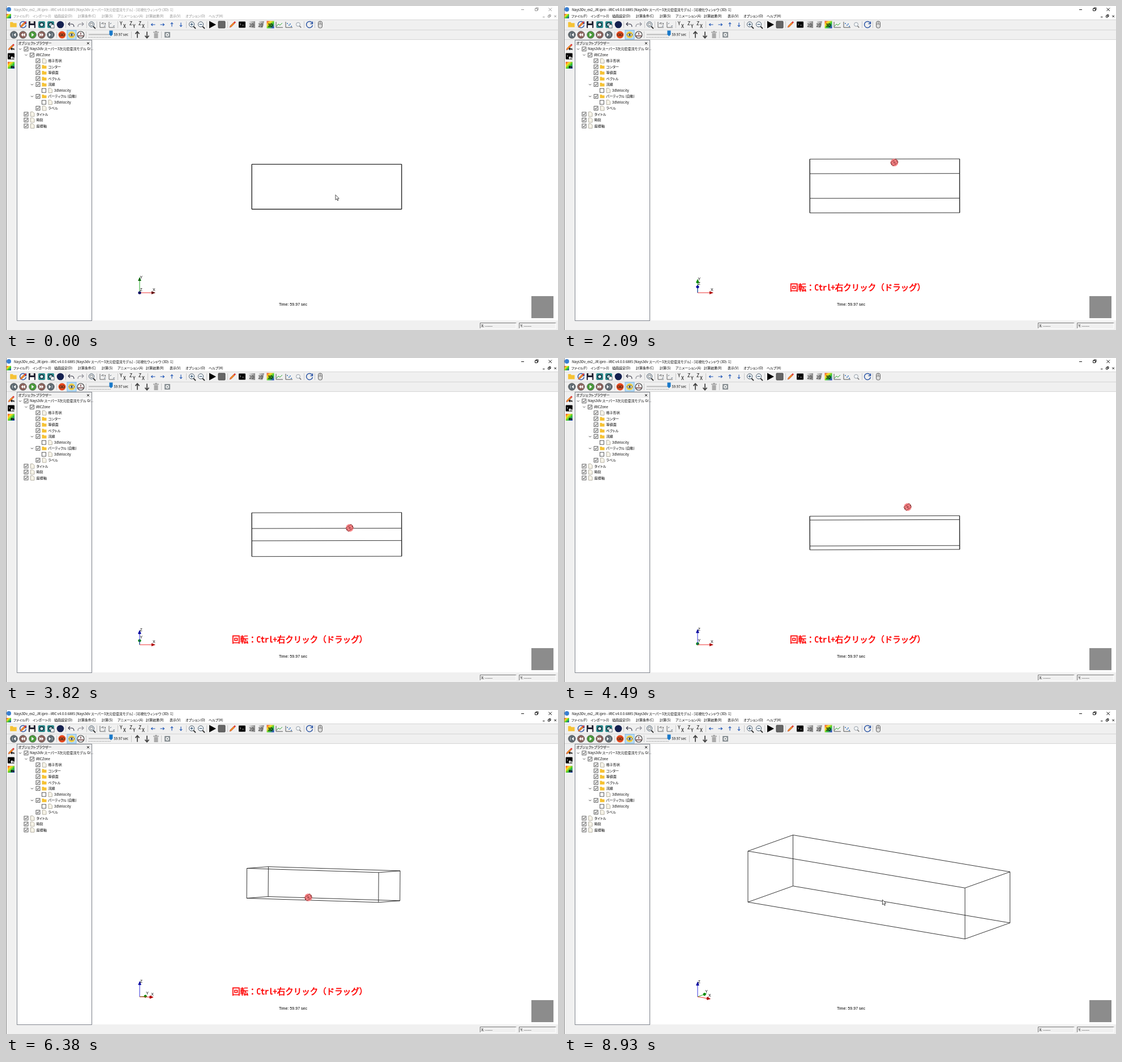
An HTML page for the animation above (9230 ms loop, 975 by 574 pixels).

```html
<!DOCTYPE html>
<html>
<head>
<meta charset="utf-8">
<title>3D view rotation</title>
<style>
html, body { margin: 0; width: 100%; height: 100%; overflow: hidden; background: #fff; }
svg { display: block; }
text { font-family: "Noto Sans CJK JP", "Noto Sans CJK", "Open Sans", sans-serif; font-feature-settings: "palt"; }
.ar { font-family: "Liberation Sans", sans-serif; }
.cap { font: 14.5px "Noto Sans Mono CJK JP", "Noto Sans CJK JP", monospace; font-feature-settings: normal; fill: #f00; stroke: #f00; stroke-width: .6; }
</style>
</head>
<body>
<svg id="stage" width="975" height="574" viewBox="0 0 975 574"></svg>
<script>
const rect = (x, y, w, h, fill, stroke = 'none', rx = 0, sw = 1) =>
  `<rect x="${x}" y="${y}" width="${w}" height="${h}" rx="${rx}" fill="${fill}" stroke="${stroke}" stroke-width="${sw}"/>`;
const circ = (x, y, r, fill, stroke = 'none', sw = 1) =>
  `<circle cx="${x}" cy="${y}" r="${r}" fill="${fill}" stroke="${stroke}" stroke-width="${sw}"/>`;
const path = (d, stroke, sw = 1, fill = 'none', dash = 'none') =>
  `<path d="${d}" stroke="${stroke}" stroke-width="${sw}" fill="${fill}" stroke-dasharray="${dash}"/>`;
const text = (x, yMid, s, size = 6.5, fill = '#000', more = '') =>
  `<text x="${x}" y="${yMid + size * .36}" font-size="${size}" fill="${fill}" ${more}>${s}</text>`;
const at = (x, y, s) => `<g transform="translate(${x} ${y})">${s}</g>`;

// Icons, each around its own centre
const folder = (k = 1) => path(`M${-5 * k} ${4 * k}v${-8 * k}h${4 * k}l${k} ${1.5 * k}h${5 * k}v${6.5 * k}z`, 'none', 0, '#f6c234');
const page = path('M-3 -4h4l2.5 2.5v5.5h-6.5z', '#a5a091', .8, '#f6f3e8');
const rainbow = r => rect(-r, -r, 2 * r, 2 * r, 'url(#rainbow)');
const label = (s, c, size = 7) => text(0, 1, s, size, c, 'text-anchor="middle" font-weight="bold"');
const lens = s => path('M3 3l4 4', '#333', 1.8) + circ(0, -.5, 4.6, '#f4f8fa', '#456', 1) + s;
const loop = path('M5 -2.5A5.5 5.5 0 1 0 5.5 1M5.5 -5.5v4h-4', '#2d56a5', 1.5);
const pencil = path('M-5 5l1 -3l6 -6l2 2l-6 6z', '#a33', .5, '#f08a24') + path('M2 -4l2 -2l2 2l-2 2z', 'none', 0, '#d33');
const axes = path('M-5 -5v10h10', '#555', .9) + path('M-3 -1l2 -2M2 3l3 -1', '#567', 1);
const camera = rect(-6, -6, 12, 12, '#2b8a8c', 'none', 2) + circ(0, 0, 3.3, '#dff', '#123', 1.5);
const arrow = (a, c, k = 1) => `<g transform="rotate(${a}) scale(${k})">${path('M-3.5 0h7M1 -2.2l2.5 2.2l-2.5 2.2', c, 1.1)}</g>`;
const plane = (a, b) => text(-6, -2, a, 8.5) + text(0, 2.5, b, 8.5);
const terminal = rect(-6, -5.5, 12, 11, '#000', 'none', 1) + path('M-4 -2l2 1.5l-2 1.5M0 1h3', '#ddd', .7);
const back = c => path('M5 5v-2h-5M2 1l-2 2l2 2', c, 1.3);
const undo = path('M-5 -1h6q4 0 4 5M-2 -4l-3 3l3 3', '#334', 1.1);
const tri = (x, d) => `M${x} -2.7l${3 * d} 2.7l${-3 * d} 2.7z`;
const media = (c, d) => circ(0, 0, 6.3, c, '#555', .8) + path(d, '#fff', .6, '#fff');
const grey = '#5f6b73', brown = '#8b625b';

const row1 = [
  [13, folder(1.15)], [30, loop + pencil],
  [46, rect(-6, -6, 12, 12, '#223', 'none', 1) + rect(-3, -6, 6, 4, '#ddd') + rect(-4, 1, 8, 5, '#fff')],
  [63, camera], [79, camera + rect(0, 0, 6, 6, '#fff', '#123', 0, .7)], [96, circ(0, 0, 6.3, '#14204f')],
  [115, undo], [132, `<g transform="scale(-1 1)" opacity=".55">${undo}</g>`],
  [151, lens(rect(-2, -2.5, 4, 4, 'none', '#555', 0, .7))], [171, axes + text(-1, -2, 'Y x', 5)], [187, axes],
  [207, plane('Y', 'X')], [224, plane('Z', 'Y')], [240, plane('Z', 'X')],
  [260, arrow(180, '#1f55b5')], [276, arrow(0, '#1f55b5')], [293, arrow(-90, '#1f55b5')], [309, arrow(90, '#1f55b5')],
  [328, lens(path('M-2.5 -.5h5M0 -3v5', '#246', 1))], [344, lens(path('M-2.5 -.5h5', '#246', 1))],
  [364, path('M-5 -6.5l12 6.5l-12 6.5z', 'none', 0, '#000')], [381, rect(-6, -6, 12, 12, '#666', '#444', 1)],
  [400, pencil], [417, terminal], [434, rect(-6, -6, 12, 12, 'url(#greys)') + label('2D', '#444')],
  [450, path('M-6 6l3 -12h9l-3 12z', 'none', 0, 'url(#greys)') + label('2D', '#444')],
  [467, rainbow(6.5) + label('3D', '#000')],
  [483, path('M-6 -5v10h12', '#555') + path('M-5 3l3 -4l3 2l4 -4', '#3a3', 1)],
  [500, path('M-6 -5v10h12', '#555') + [[-3, -2], [0, 1], [2, -1], [4, 3]].map(p => circ(...p, .9, '#26b')).join('')],
  [516, `<g transform="scale(.75)" opacity=".7">${lens('')}</g>`], [536, loop],
  [555, rect(-3.5, -6, 7, 12, '#ddd', '#666', 3) + path('M-3.5 -1h7M0 -6v5', '#666', .8)]
];
const row2 = [
  [14, media(grey, tri(3, -1) + 'M-2.5 -2.5v5')], [30, media(brown, tri(0, -1) + tri(3.5, -1))],
  [47, media('#4a9b3b', tri(-1.5, 1.2))], [63, media(brown, tri(-3.5, 1) + tri(0, 1))],
  [79, media(grey, tri(-3, 1) + 'M2.5 -2.5v5')],
  [99, circ(0, 0, 6.5, '#e8481c') + circ(-2.3, 0, 2, 'none', '#432', 1.1) + circ(2.3, 0, 2, 'none', '#432', 1.1)],
  [116, rect(-8, -8, 16, 16, '#b9dcf5', '#7db7e4') + circ(0, 0, 6, '#f2cf45') + path('M-5 0q5 -5 10 0q-5 5 -10 0', '#333', .8, '#fff') + circ(0, 0, 1.8, '#245')],
  [132, circ(0, 0, 6, '#eee', '#444', 1.2) + path('M0 -4v4M-5 2h10', '#744', 1.3)],
  [232, arrow(-90, '#444', 1.6)], [249, arrow(90, '#444', 1.6)],
  [265, rect(-3.5, -3, 7, 9, '#aaa') + path('M-5 -4.5h10M-1.5 -6h3', '#999', 1.3)],
  [285, rect(-5, -5, 10, 10, '#8b9296', 'none', 1) + circ(0, 0, 2.2, 'none', '#fff', 1.4)]
];
const menus = [[13, 'ファイル(F)'], [47, 'インポート(I)'], [85, '描画設定(D)'], [127, '計算条件(C)'], [169, '計算(S)'],
  [197, 'アニメーション(A)'], [247, '計算結果(R)'], [289, '表示(V)'], [317, 'オプション(O)'], [358, 'ヘルプ(H)']];
// depth, label, icon, checked, open
const tree = [[0, 'Nays3dv スーパー3次元密度流モデル Gr...', '', 1, 1], [1, 'iRICZone', '', 1, 1], [2, '格子形状', page, 1],
  [2, 'コンター', 'f', 1], [2, '等値面', 'f', 1], [2, 'ベクトル', 'f', 1], [2, '流線', 'f', 1, 1], [3, '3dVelocity', page, 0],
  [2, 'パーティクル (自動)', 'f', 1, 1], [3, '3dVelocity', page, 0], [2, 'ラベル', page, 1],
  [0, 'タイトル', page, 1], [0, '時刻', page, 1], [0, '座標軸', page, 1]];

function treeRow([depth, name, icon, on, open], i) {
  const x = 35.5 + depth * 10.5, y = 76.3 + i * 10.48;
  return (open ? path(`M${x - 12.5} ${y - 1}l2 2l2 -2`, '#444', .9) : '') +
    rect(x - 3.5, y - 3.5, 7, 7, '#fff', '#333', 0, .8) +
    (on ? path(`M${x - 2} ${y}l1.5 1.7l2.7 -3.5`, '#111', .9) : '') +
    (icon ? at(x + 11, y, icon === 'f' ? folder(.8) : icon) : '') +
    text(x + (icon ? 18 : 6.5), y, name, 6.1);
}
const sep = (x, y) => path(`M${x}.5 ${y - 6}v12`, '#c8c8c8');
const field = (x, w, s) => path(`M${x}.5 571v-9.5h${w}`, '#777') + path(`M${x} 571.5h${w}v-10`, '#fff') + text(x + 2.5, 566.5, s, 6.3);

const shell =
  `<defs><linearGradient id="rainbow" x2="1" y2="1"><stop stop-color="#e33"/><stop offset=".3" stop-color="#fd2"/>
  <stop offset=".6" stop-color="#3c3"/><stop offset="1" stop-color="#22d"/></linearGradient>
  <linearGradient id="greys"><stop stop-color="#eee"/><stop offset="1" stop-color="#888"/></linearGradient></defs>` +
  rect(0, 0, 975, 574, '#fff') + rect(0, 25, 975, 35, '#f0f0f0') + rect(0, 60, 153, 514, '#f0f0f0') + rect(0, 557, 975, 17, '#f0f0f0') +
  path('M0 24.5h975M0 42.5h975M0 59.5h975', '#d5d5d5') + path('M.5 0v574', '#8a8a8a') +
  circ(5, 6, 4, '#3a7fd0') + at(5, 18, rainbow(4)) +
  '<g id="bar">' + text(14, 6.5, 'Nays3Dv_ex2_JR.ipro - iRIC v4.0.0.6885 [Nays3dv スーパー3次元密度流モデル] - [可視化ウィンドウ (3D): 1]', 5.95, 'currentColor') +
  menus.map(([x, s]) => text(x, 18, s, 6, 'currentColor')).join('') +
  path('M910 6.5h5M934.5 4.5h4v4h-4zM936 4.5v-1.5h4v4h-1.5M958.5 3.5l5.5 5.5M964 3.5l-5.5 5.5M948 19.5h3.5M957.5 17h3v3h-3zM959 17v-1.5h3v3h-1.5M968.5 16.5l3.5 3.5M972 16.5l-3.5 3.5', 'currentColor', .9) + '</g>' +
  row1.map(([x, s]) => at(x, 33, s)).join('') + row2.map(([x, s]) => at(x, 51, s)).join('') +
  [105, 142, 160, 197, 250, 318, 354, 391, 526, 545].map(x => sep(x, 33)).join('') + [89, 141, 221, 274].map(x => sep(x, 51)).join('') +
  path('M146 50.5h40', '#bbb', 2) + path('M146 55.5h40', '#777', 1, 'none', '1 1.5') +
  path('M182.5 43.5h6v7l-3 3l-3 -3z', 'none', 0, '#1979ca') + text(190.5, 51, '59.97 sec', 6) +
  at(9, 73, pencil + back('#111')) + at(9, 89, terminal + back('#fff')) + at(9, 105, rainbow(6) + back('#111')) +
  rect(19.5, 60.5, 132, 497, '#fff', '#828790') + rect(20, 61, 131, 10, '#f0f0f0') +
  text(21.5, 66, 'オブジェクトブラウザー', 6) + path('M143 64l4 4M147 64l-4 4', '#222', 1) +
  tree.map(treeRow).join('') +
  field(837, 64, 'X: ------') + field(906, 65, 'Y: ------') +
  text(507, 528.5, 'Time: 59.97 sec', 7.1, '#000', 'class="ar" text-anchor="middle"') +
  rect(928, 514, 39, 39, '#8c8c8c');

const turn = `<g transform="rotate(-35)">${path('M-3 -3.5h-3v7h3M3 -3.5h3v7h-3M-4.5 -1.5l-1.5 2M4.5 1.5l1.5 -2M-2 -3.5h4M-2 3.5h4', '#4a1515', .7, 'none', '4 1')}</g>` +
  circ(0, 0, 1.3, 'none', '#4a1515', .6);
const stage = document.getElementById('stage');
stage.innerHTML = shell + '<path id="box" fill="none" stroke="#111" stroke-width=".85"/><g id="axes"></g>' +
  '<text id="cap" class="cap" x="399" y="503.7"></text>' +
  `<g id="arrow">${path('M0 0v9l2 -2l1.5 3.3l1.5 -.7l-1.5 -3h2.8z', '#222', .8, '#fff')}</g>` +
  `<g id="turn">${circ(0, 0, 6.7, '#f58083') + turn}</g>`;
const el = id => document.getElementById(id);

// time, cursor x, cursor y, tilt, heading (degrees), roll (radians)
const keys = [
  [0, 583.5, 341, 0, 0, 0], [1000, 583.5, 341, 0, 0, 0], [1530, 583.5, 321.5, 10.3, 0, 0],
  [2740, 583.5, 226, 50.9, 0, -.003], [3060, 583.5, 201, 61.2, 0, -.003], [3120, 583.5, 201, 61.2, 0, -.003],
  [3480, 607, 321, 61.2, 0, -.002], [3820, 607, 301, 69.5, 0, -.002], [4890, 607, 242, 94.3, 0, -.004],
  [5190, 607, 242, 94.3, 0, -.004], [5460, 658, 312, 94.3, 0, -.005], [5510, 656, 312.5, 94.2, .5, -.005],
  [6060, 582, 320, 91, 18, .003], [6380, 534, 332, 87.4, 28.4, .007], [7050, 510, 357, 76.2, 34.2, .001],
  [7150, 508, 358, 75.7, 34.6, 0], [7550, 564, 342.5, 75.7, 34.6, 0], [9230, 564, 342.5, 75.7, 34.6, 0]
];
const drags = [[860, 3090], [3480, 5190], [5460, 7150]];

function pose(t) {
  const i = Math.max(1, keys.findIndex(k => k[0] > t)), a = keys[i - 1], b = keys[i];
  const f = (t - a[0]) / (b[0] - a[0]);
  return a.map((v, j) => v + (b[j] - v) * f);
}

// Parallel projection; returns screen offset and depth towards the viewer
function camera3d(tilt, heading, roll) {
  const r = Math.PI / 180, s = Math.sin(heading * r), c = Math.cos(heading * r), st = Math.sin(tilt * r), ct = Math.cos(tilt * r);
  return (x, y, z) => {
    const sx = x * c + y * s, far = y * c - x * s, sy = -(z * st + far * ct);
    return [sx - sy * roll, sy + sx * roll, z * ct - far * st];
  };
}

function wire(view, zoom) {
  const p = (i, j, k) => {
    const [x, y] = view(3 + 132.3 * i, -11.5 + 39.8 * j, 26.5 * k);
    return `${(563.5 + x * zoom).toFixed(2)} ${(308.7 + y * zoom).toFixed(2)}`;
  };
  let d = '';
  for (const a of [-1, 1]) for (const b of [-1, 1])
    d += `M${p(-1, a, b)}L${p(1, a, b)}M${p(a, -1, b)}L${p(a, 1, b)}M${p(a, b, -1)}L${p(a, b, 1)}`;
  return d;
}

function triad(view, dim) {
  const list = [
    ['X', '#e33', dim ? '#600000' : '#b00000', view(1, 0, 0)],
    ['Y', '#2a2', dim ? '#006400' : '#008a00', view(0, 1, 0)],
    ['Z', '#33d', dim ? '#000060' : '#0000a0', view(0, 0, 1)]
  ].sort((a, b) => a[3][2] - b[3][2]);
  return list.map(([, line, cone, [x, y, z]]) => {
    const X = 236 + x * 28, Y = 508 + y * 28, bx = 236 + x * 21, by = 508 + y * 21, len = Math.hypot(x, y) || 1;
    const nx = -y / len * 2.8, ny = x / len * 2.8, ang = Math.atan2(y, x) * 180 / Math.PI;
    return path(`M236 508L${bx} ${by}`, line) +
      `<ellipse rx="${2.6 * Math.abs(z)}" ry="2.6" fill="${cone}" transform="translate(${bx} ${by}) rotate(${ang})"/>` +
      path(`M${bx + nx} ${by + ny}L${X} ${Y}L${bx - nx} ${by - ny}z`, 'none', 0, cone);
  }).join('') + list.map(([name, , , [x, y]]) =>
    text(236.5 + x * 22.5, 502.5 + y * 22, name, 7, '#000', 'class="ar"')).join('');
}

function draw(t) {
  const [, x, y, tilt, heading, roll] = pose(t);
  const view = camera3d(tilt, heading, roll);
  const steps = [7870, 8170, 8620].filter(s => t >= s).length;
  el('box').setAttribute('d', wire(view, 1.76 ** (steps / 3)));
  el('axes').innerHTML = triad(view, t < 1010);
  el('bar').style.color = t < 1010 ? '#8c8c8c' : '#000';

  const second = t >= 7100;
  el('cap').textContent = second ? '拡大縮小：マウスホイール' : '回転：Ctrl+右クリック（ドラッグ）';
  el('cap').style.opacity = t >= 8930 ? 0 : Math.min(1, Math.max(0, (t - (second ? 7100 : 360)) / 500));

  const down = drags.some(([a, b]) => t >= a && t < b);
  el('arrow').style.display = down ? 'none' : '';
  el('turn').style.display = down ? '' : 'none';
  el('arrow').setAttribute('transform', `translate(${x - 1.5} ${y - 6.5})`);
  el('turn').setAttribute('transform', `translate(${x} ${y})`);
}

const start = performance.now();
function tick() {
  draw((performance.now() - start) % 9230);
  requestAnimationFrame(tick);
}
tick();
</script>
</body>
</html>
```
